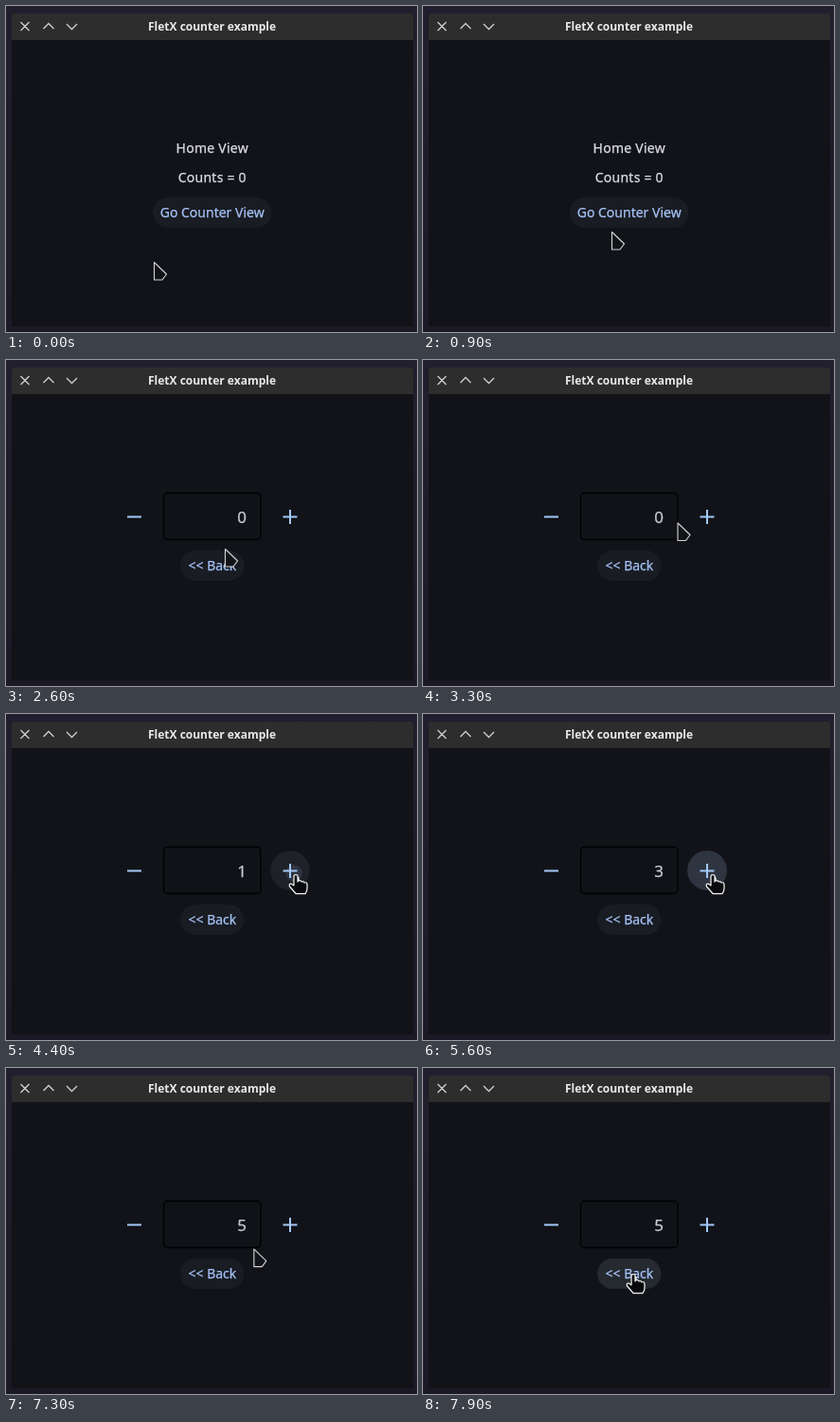
Recreate the animation shown at these times as an HTML page. Size 434x344 px, loop 8000 ms.

```html
<!DOCTYPE html>
<html lang="en">
<head>
<meta charset="utf-8">
<title>Counter example</title>
<style>
  html, body { margin: 0; width: 100%; height: 100%; overflow: hidden; background: #201d2a; }
  svg { display: block; width: 434px; height: 344px; }
  text {
    font: 14px "Noto Sans", sans-serif; text-anchor: middle;
    fill: #dcdce3; stroke: #dcdce3; stroke-width: .25; letter-spacing: .25px;
  }
  .title { font-size: 12px; font-weight: 700; fill: #e8e8e8; stroke: none; letter-spacing: 0; }
  .blue { fill: #a5c1f6; stroke: #a5c1f6; letter-spacing: 0; }
  .count { font-size: 17px; fill: #c9cad2; stroke: #c9cad2; text-anchor: end; letter-spacing: 0; }
  .pill { fill: #191c22; }
  .glow { fill: #aac7ff; }
  .hover { fill: #b4c2dc; }
  .icon { fill: none; stroke: #cfcfcf; stroke-width: 1.3; }
  .sign { fill: none; stroke: #a4c9fa; stroke-width: 2; }
  .pointer { stroke-linejoin: round; }
  #arrow { fill: #111318; stroke: #d2d2d2; stroke-width: 1.15; }
  #hand { fill: #08090b; stroke: #f0f0f0; stroke-width: 1.25; }
</style>
</head>
<body>
<svg viewBox="0 0 434 344">
  <defs>
    <linearGradient id="desk" x1="0" y1="0" x2="0" y2="1">
      <stop offset="0" stop-color="#211f2d"/>
      <stop offset="1" stop-color="#1b1925"/>
    </linearGradient>
    <radialGradient id="soft">
      <stop offset=".6" stop-color="#aac7ff"/>
      <stop offset="1" stop-color="#aac7ff" stop-opacity="0"/>
    </radialGradient>
    <clipPath id="clipGo"><rect x="155" y="202" width="125.500" height="32" rx="16"/></clipPath>
    <clipPath id="clipPlus"><circle cx="300" cy="165" r="21"/></clipPath>
  </defs>
  <rect width="434" height="344" fill="url(#desk)"/>
  <path d="M6 338V11q0-3 3-3H427q3 0 3 3V338z" fill="#111318"/>
  <path d="M6 36V11q0-3 3-3H427q3 0 3 3V36z" fill="#2d2d2d"/>
  <path class="icon" d="M15.500 17l9 9m0-9l-9 9M39.500 24l5.500-5.500 5.500 5.500M64 19l5.500 5.500 5.500-5.500"/>
  <text class="title" x="217.500" y="25.500">FletX counter example</text>

  <g id="home">
    <text x="217.800" y="155.400">Home View</text>
    <text x="217.800" y="186.400">Counts = 0</text>
    <rect class="pill" x="155" y="202" width="125.500" height="32" rx="16"/>
    <g clip-path="url(#clipGo)">
      <rect id="hoverGo" class="hover" x="155" y="202" width="126" height="32"/>
      <circle id="rippleGo" fill="url(#soft)" cx="212" cy="222"/>
    </g>
    <text class="blue" x="217.700" y="223.400">Go Counter View</text>
  </g>

  <g id="counter">
    <path class="sign" d="M128 165.500h15"/>
    <rect x="166.500" y="140.500" width="102.500" height="49" rx="4" fill="#101217" stroke="#000" stroke-width="1.300"/>
    <text id="count" class="count" x="254" y="172">0</text>
    <g clip-path="url(#clipPlus)">
      <circle id="hoverPlus" class="hover" cx="300" cy="165" r="21"/>
      <circle id="ripplePlus" class="glow" cx="304" cy="168"/>
    </g>
    <path class="sign" d="M292.500 165.500h15m-7.500-7.500v15"/>
    <rect class="pill" x="184" y="201" width="67.500" height="32" rx="16"/>
    <rect id="hoverBack" class="hover" x="184" y="201" width="67.500" height="32" rx="16"/>
    <text class="blue" x="217.900" y="222.400">&lt;&lt; Back</text>
  </g>

  <g id="pointer" class="pointer">
    <path id="arrow" d="M.5.5L13.500 13 9 19H.5z"/>
    <path id="hand" d="M-2 12V2Q-2 .5 0 .5T2 2V8Q3-.5 3 7 5 6 6 8 8 7 9 9 12 8 12 11V15Q12 18 10 20.500H0L-6.500 13Q-7.500 10-5 10z"/>
  </g>
</svg>
<script>
const LOOP = 8000;
const $ = id => document.getElementById(id);
const clamp = v => Math.max(0, Math.min(1, v));
const ramp = (t, from, to) => clamp((t - from) / (to - from));
const smooth = p => p * p * (3 - 2 * p);

// time, x, y
const path = [
  [200, 156, 270], [750, 199, 238], [950, 199, 238], [1600, 210, 225.5],
  [2400, 210, 225.5], [2600, 231, 199], [3200, 268, 172], [3500, 270, 170],
  [3750, 306, 169], [5700, 306, 169], [6300, 302, 168], [6900, 302, 168],
  [7700, 221, 213], [7900, 222, 217]
];
const plusClicks = [4350, 4850, 5400, 5900, 6350];
const goClick = 2030;
const zoomStart = 2150, zoomEnd = 2450;
const hovers = {
  Go: [1200, 2500],
  Plus: [3580, 7060],
  Back: [7570, LOOP]
};

function position(t) {
  const i = path.findIndex(step => step[0] > t);
  if (i === 0) return path[0].slice(1);
  if (i < 0) return path[path.length - 1].slice(1);
  const [t0, x0, y0] = path[i - 1], [t1, x1, y1] = path[i];
  const p = smooth(ramp(t, t0, t1));
  return [x0 + (x1 - x0) * p, y0 + (y1 - y0) * p];
}

function ripple(id, age) {
  const live = age >= 0 && age < 500;
  $(id).setAttribute("r", live ? age * 0.17 : 0);
  $(id).setAttribute("opacity", 0.12 * (1 - ramp(age, 200, 500)));
}

function scaleView(id, scale, opacity) {
  $(id).setAttribute("transform", `translate(218 187) scale(${scale}) translate(-218 -187)`);
  $(id).setAttribute("opacity", opacity);
}

function draw(t) {
  const zoom = ramp(t, zoomStart, zoomEnd);
  scaleView("home", 1 + 0.05 * zoom, 1 - ramp(zoom, 0.3, 0.7));
  scaleView("counter", 0.85 + 0.15 * smooth(zoom), ramp(zoom, 0.3, 0.8));

  let pointing = false;
  for (const [name, [from, to]] of Object.entries(hovers)) {
    const glow = ramp(t, from, from + 100) * (1 - ramp(t, to, to + 100));
    $("hover" + name).setAttribute("opacity", 0.075 * glow);
    pointing ||= t >= from && t < to;
  }

  const clicks = plusClicks.filter(time => time <= t);
  $("count").textContent = clicks.length;
  ripple("rippleGo", t - goClick);
  ripple("ripplePlus", clicks.length ? t - clicks[clicks.length - 1] : -1);

  $("pointer").setAttribute("transform", `translate(${position(t).join(" ")})`);
  $("hand").style.display = pointing ? "" : "none";
  $("arrow").style.display = pointing ? "none" : "";
}

const start = performance.now();
function tick() {
  draw((performance.now() - start) % LOOP);
  requestAnimationFrame(tick);
}
tick();
</script>
</body>
</html>
```
